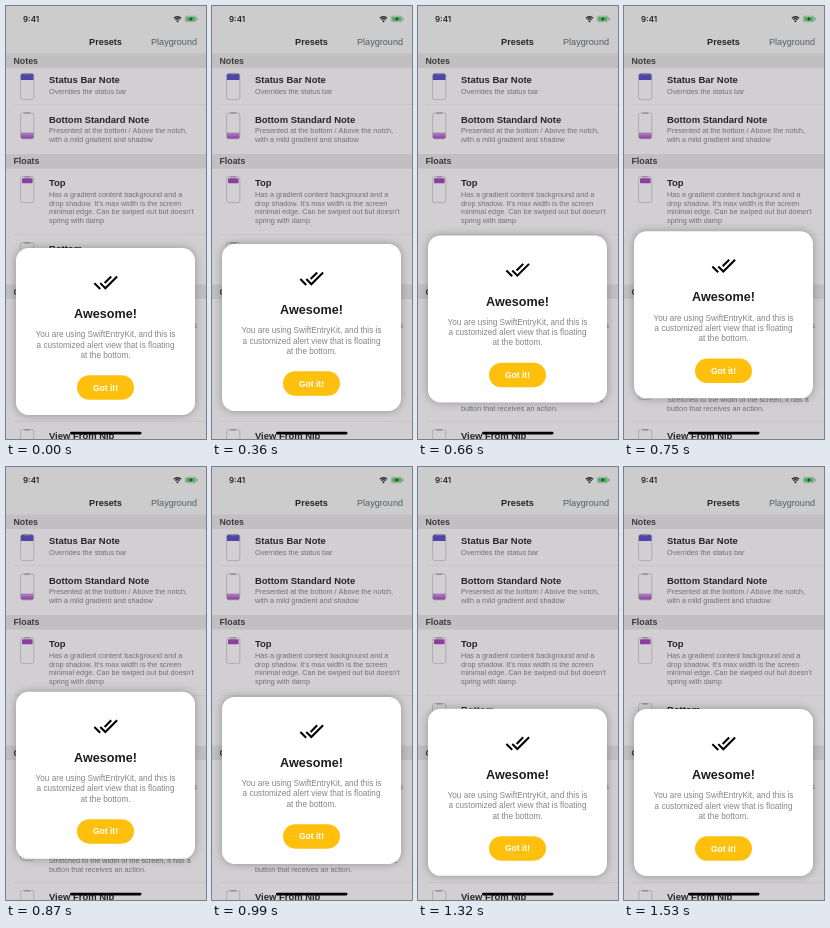
An HTML page with a canvas that plays this animation: 200 px wide and 433 px high, repeating every 1560 ms.

```html
<!DOCTYPE html>
<html lang="en">
<head>
<meta charset="utf-8">
<title>Floating alert</title>
<style>
  html, body { margin: 0; width: 100%; height: 100%; overflow: hidden; background: #d1cfd1; }
  canvas { display: block; width: 200px; height: 433px; }
</style>
</head>
<body>
<canvas id="stage"></canvas>
<script>
const W = 200, H = 433, LOOP = 1560;
const REST_TOP = 242, RELEASE = 970, PEAK = 17.5;
const SANS = '"Liberation Sans", Arial, sans-serif';
const INK = '#262526', GRAY = '#717073', LINE = '#bfbdbf';
const PURPLE = '#8b3fa4', INDIGO = '#4f46a8';

const canvas = document.getElementById('stage');
const ctx = canvas.getContext('2d');
const ratio = window.devicePixelRatio || 1;
canvas.width = W * ratio;
canvas.height = H * ratio;

const checks = new Path2D('M18 7l-1.41-1.41-6.34 6.34 1.41 1.41L18 7z' +
  'M22.24 5.59L11.66 16.17 7.48 12l-1.41 1.41L11.66 19l12-12-1.42-1.41z' +
  'M.41 13.41L6 19l1.41-1.41L1.83 12 .41 13.41z');

function rect(x, y, w, h, color) {
  ctx.fillStyle = color;
  ctx.fillRect(x, y, w, h);
}

function roundRect(x, y, w, h, r, color) {
  ctx.beginPath();
  ctx.roundRect(x, y, w, h, r);
  ctx.fillStyle = color;
  ctx.fill();
}

// y is the middle of the capital letters
function text(str, x, y, size, color, weight = 400, align = 'left', family = SANS) {
  ctx.font = `${weight} ${size}px ${family}`;
  ctx.textAlign = align;
  ctx.fillStyle = color;
  ctx.fillText(str, x, y + size * 0.36);
}

// Each band draws the coloured part of a phone whose top is at y
const bands = {
  statusBar: y => roundRect(14.7, y + 0.3, 13, 6.5, [2, 2, 0, 0], INDIGO),
  bottom(y) {
    const fade = ctx.createLinearGradient(0, y + 19.5, 0, y + 26);
    fade.addColorStop(0, '#b08cc0');
    fade.addColorStop(1, PURPLE);
    roundRect(14.7, y + 19.8, 13, 6.3, [0, 0, 2, 2], fade);
  },
  float: y => roundRect(16, y + 2, 10.6, 5, 0.8, PURPLE),
  none() {}
};

function phone(y, band) {
  bands[band](y);
  ctx.beginPath();
  ctx.roundRect(14.6, y + 0.3, 13.2, 26, 2);
  ctx.strokeStyle = '#97949c';
  ctx.lineWidth = 0.6;
  ctx.stroke();
  roundRect(18.2, y, 6, 1.1, 0.5, '#8a8790');
}

function header(title, y) {
  rect(0, y, W, 14.5, '#c1bfc1');
  text(title, 7.5, y + 7.2, 8.8, '#3c3b3c', 700);
}

function row(top, title, lines, band) {
  phone(top + 7.3, band);
  text(title, 43, top + 14, 9.45, INK, 700);
  lines.forEach((s, i) => text(s, 43, top + 25.3 + i * 8.7, 7.27, GRAY));
}

function statusBar() {
  text('9:41', 17, 13, 8, INK, 600, 'left', 'Inter, sans-serif');
  ctx.strokeStyle = ctx.fillStyle = INK;
  ctx.lineWidth = 1.4;
  for (const r of [2.9, 5]) {
    ctx.beginPath();
    ctx.arc(171.5, 15.7, r, -Math.PI * 0.75, -Math.PI * 0.25);
    ctx.stroke();
  }
  ctx.beginPath();
  ctx.arc(171.5, 15.3, 1, 0, Math.PI * 2);
  ctx.fill();

  ctx.beginPath();
  ctx.roundRect(179.3, 10.2, 11, 5.6, 1.6);
  ctx.lineWidth = 0.6;
  ctx.strokeStyle = '#888';
  ctx.stroke();
  roundRect(180.2, 11.1, 9.2, 3.8, 0.8, '#43b359');
  rect(190.9, 12, 0.8, 2, '#888');
  ctx.beginPath();
  ctx.moveTo(185.5, 10.5);
  ctx.lineTo(183.2, 13.4);
  ctx.lineTo(184.7, 13.4);
  ctx.lineTo(184.1, 15.6);
  ctx.lineTo(186.5, 12.6);
  ctx.lineTo(185, 12.6);
  ctx.fillStyle = INK;
  ctx.fill();
}

function screen() {
  rect(0, 0, W, H, '#d1cfd1');
  rect(0, 0, W, 47.5, '#cdcccd');
  statusBar();
  text('Presets', 99.5, 36, 9.1, INK, 700, 'center');
  text('Playground', 191, 36, 9.1, '#505d66', 400, 'right');

  header('Notes', 47.5);
  row(60, 'Status Bar Note', ['Overrides the status bar'], 'statusBar');
  rect(8, 98, W - 8, 0.5, LINE);
  row(99.3, 'Bottom Standard Note',
    ['Presented at the bottom / Above the notch,', 'with a mild gradient and shadow'], 'bottom');

  header('Floats', 148);
  row(163, 'Top', ['Has a gradient content background and a',
    "drop shadow. It's max width is the screen",
    "minimal edge. Can be swiped out but doesn't",
    'spring with damp'], 'float');
  rect(8, 228.5, W - 8, 0.5, LINE);
  row(229, 'Bottom', [], 'none');

  header('Custom', 278.5);
  text('with buttons', 191, 319.5, 7.27, GRAY, 400, 'right');
  row(359.8, '', ['Slides in at the bottom of the screen.',
    'Stretched to the width of the screen, it has a',
    'button that receives an action.'], 'none');
  rect(8, 415.5, W - 8, 0.5, LINE);
  row(416, 'View From Nib', [], 'none');
}

function card(top) {
  ctx.save();
  ctx.shadowColor = 'rgba(0,0,0,.3)';
  ctx.shadowBlur = 8 * ratio;
  roundRect(10, top, 179, 167, 12.5, '#fff');
  ctx.restore();

  ctx.save();
  ctx.translate(99.7, top + 34.7);
  ctx.scale(1.04, 1.04);
  ctx.translate(-12, -12.3);
  ctx.fillStyle = '#000';
  ctx.fill(checks);
  ctx.restore();

  text('Awesome!', 99.5, top + 65.6, 12.6, '#1c1c1c', 700, 'center');
  ['You are using SwiftEntryKit, and this is',
    'a customized alert view that is floating',
    'at the bottom.'
  ].forEach((s, i) => text(s, 99.5, top + 86.4 + i * 10.2, 8.2, '#858585', 400, 'center'));

  roundRect(71, top + 127.3, 57, 24.5, 12.2, '#ffc00d');
  text('Got it!', 99.5, top + 139.5, 8.5, '#fff', 700, 'center');
}

// Upward pull by the finger, then a damped spring back to rest
const pull = [[0, 0], [300, 3], [540, 7], [750, 16.7], [RELEASE, PEAK]];

function lift(t) {
  if (t >= RELEASE) {
    const s = t - RELEASE;
    return PEAK * Math.exp(-0.014 * s) * Math.cos(0.018 * s);
  }
  const i = pull.findIndex(p => p[0] > t);
  const [t0, a] = pull[i - 1], [t1, b] = pull[i];
  return a + (b - a) * (t - t0) / (t1 - t0);
}

function draw() {
  const t = performance.now() % LOOP;
  ctx.setTransform(ratio, 0, 0, ratio, 0, 0);
  screen();
  card(REST_TOP - lift(t));
  roundRect(64, 425.7, 71.5, 2.7, 1.35, '#000');
  requestAnimationFrame(draw);
}
draw();
</script>
</body>
</html>
```
